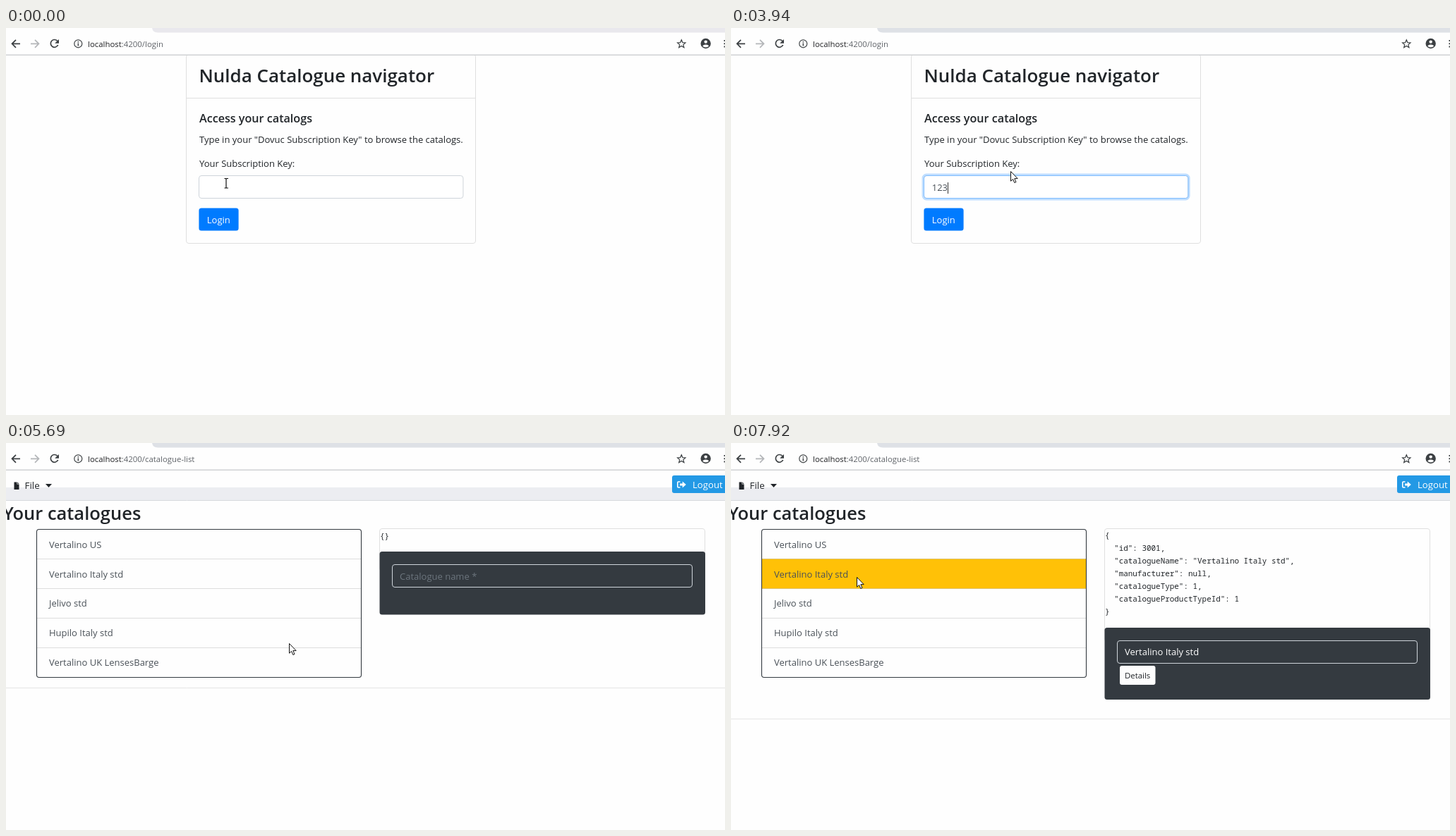
An HTML page for the animation above (8 s loop, 1019x549 px).

```html
<!DOCTYPE html>
<html lang="en">
<head>
<meta charset="utf-8">
<title>Catalogue navigator</title>
<style>
html, body { margin: 0; width: 100%; height: 100%; overflow: hidden; background: #fefefe; }
svg { display: block; width: 1019px; height: 549px; }
text { font: 13px "Open Sans", "Noto Sans", sans-serif; fill: #212529; white-space: pre; }
.h2 { font-size: 25.95px; font-weight: 600; }
.h5 { font-size: 16.15px; font-weight: 600; }
.url { font-size: 11.4px; fill: #5f6368; }
.url tspan { fill: #202124; }
.small { font-size: 10.5px; }
.soft, .soft text { fill: #495057; }
.white { fill: #fff; }
.json text { font: 10.93px "Noto Sans Mono", "DejaVu Sans Mono", monospace; }
.line { fill: none; stroke: #dfdfdf; }
.icon { fill: none; stroke: #3c4043; stroke-width: 1.7; }
.pop { fill: #fff; filter: drop-shadow(0 1px 1.5px rgba(0, 0, 0, .4)); }

/* Every change is a hard cut on one 8 s clock */
.a { animation: 8s step-end infinite; }
#strip { animation-name: strip; }
#login { animation-name: login; }
#list { animation-name: list; }
#focus { animation-name: focus; }
#pop6 { animation-name: pop6; }
#pop2 { animation-name: pop2; }
#caret { animation-name: caret; }
#k1 { animation-name: k1; }
#k2 { animation-name: k2; }
#k3 { animation-name: k3; }
#ring { animation-name: ring; }
#btn { animation-name: btn; }
#rows { animation-name: rows; }
.glyph { animation-name: glyph; }
#row1 { animation-name: row1; }
#row2 { animation-name: row2; }
#empty, #hint { animation-name: empty; }
#filled { animation-name: filled; }
#first { animation-name: first; }
#second { animation-name: second; }
#cursor { animation-name: move; }
#beam { animation-name: beam; }
#arrow { animation-name: arrow; }
#hand { animation-name: hand; }

@keyframes strip { 0% { fill: #e9e8ed } 14.5%, 100% { fill: #dee1e6 } }
@keyframes login { 0% { opacity: 1 } 67.75%, 100% { opacity: 0 } }
@keyframes list { 0% { opacity: 0 } 67.75%, 100% { opacity: 1 } }
@keyframes focus { 0% { opacity: 0 } 14.5% { opacity: 1 } 57.5%, 100% { opacity: 0 } }
@keyframes pop6 { 0% { opacity: 0 } 16% { opacity: 1 } 21.25%, 100% { opacity: 0 } }
@keyframes pop2 { 0% { opacity: 0 } 21.25% { opacity: 1 } 46.125%, 100% { opacity: 0 } }
@keyframes k1 { 0% { fill-opacity: 0 } 21.25%, 100% { fill-opacity: 1 } }
@keyframes k2 { 0% { fill-opacity: 0 } 29.25%, 100% { fill-opacity: 1 } }
@keyframes k3 { 0% { fill-opacity: 0 } 30.75%, 100% { fill-opacity: 1 } }
@keyframes caret {
  0% { opacity: 0; transform: translateX(0) }
  14.5% { opacity: 1; transform: translateX(0) }
  21.25% { opacity: 1; transform: translateX(7px) }
  29.25% { opacity: 1; transform: translateX(15px) }
  30.75% { opacity: 1; transform: translateX(22px) }
  37.75% { opacity: 0; transform: translateX(22px) }
  44.375% { opacity: 1; transform: translateX(22px) }
  51.125%, 100% { opacity: 0; transform: translateX(22px) }
}
@keyframes ring { 0% { opacity: 0 } 57.5%, 100% { opacity: 1 } }
@keyframes btn {
  0% { fill: #007bff } 55.625% { fill: #0069d9 } 57.5% { fill: #0062cc }
  59.125% { fill: #0069d9 } 61% { fill: #007bff } 64.375% { fill: #0069d9 }
  66.25%, 100% { fill: #0062cc }
}
@keyframes rows { 0% { opacity: 0 } 69.375%, 100% { opacity: 1 } }
@keyframes glyph { 0% { opacity: 0 } 71.125%, 100% { opacity: 1 } }
@keyframes row1 { 0% { fill: #fefefe } 83.125% { fill: #e9ecef } 84.625% { fill: #ffc107 } 99%, 100% { fill: #fefefe } }
@keyframes row2 { 0% { fill: #fefefe } 97.25% { fill: #e9ecef } 99%, 100% { fill: #ffc107 } }
@keyframes empty { 0% { opacity: 1 } 84.625%, 100% { opacity: 0 } }
@keyframes filled { 0% { opacity: 0 } 84.625%, 100% { opacity: 1 } }
@keyframes first { 0% { opacity: 1 } 99%, 100% { opacity: 0 } }
@keyframes second { 0% { opacity: 0 } 99%, 100% { opacity: 1 } }
@keyframes beam {
  0% { opacity: 1 } 42.75% { opacity: 0 } 51.125% { opacity: 1 } 52.625%, 100% { opacity: 0 }
}
@keyframes arrow {
  0% { opacity: 0 } 42.75% { opacity: 1 } 51.125% { opacity: 0 } 52.625% { opacity: 1 }
  54.125% { opacity: 0 } 61% { opacity: 1 } 64.375% { opacity: 0 } 67.75%, 100% { opacity: 1 }
}
@keyframes hand {
  0% { opacity: 0 } 54.125% { opacity: 1 } 61% { opacity: 0 } 64.375% { opacity: 1 } 67.75%, 100% { opacity: 0 }
}
@keyframes move {
  0% { transform: translate(312px, 220px) }
  17.875% { transform: translate(330px, 219px) }
  19.5% { transform: translate(347px, 220px) }
  30.75% { transform: translate(343px, 216px) }
  41.25% { transform: translate(358px, 212px) }
  42.75% { transform: translate(380px, 198px) }
  44.375% { transform: translate(391px, 190px) }
  46.125% { transform: translate(391px, 189px) }
  47.625% { transform: translate(394px, 195px) }
  49.25% { transform: translate(396px, 203px) }
  51.125% { transform: translate(385px, 222px) }
  52.625% { transform: translate(356px, 246px) }
  54.125% { transform: translate(322px, 272px) }
  55.625% { transform: translate(314px, 267px) }
  61% { transform: translate(332px, 268px) }
  64.375% { transform: translate(314px, 267px) }
  69.375% { transform: translate(340px, 270px) }
  71.125% { transform: translate(401px, 284px) }
  73% { transform: translate(485px, 284px) }
  74.875% { transform: translate(420px, 230px) }
  76.375% { transform: translate(350px, 174px) }
  78.25% { transform: translate(290px, 160px) }
  79.75% { transform: translate(235px, 152px) }
  81.25% { transform: translate(203px, 150px) }
  86.625% { transform: translate(291px, 217px) }
  88.5% { transform: translate(291px, 219px) }
  90.25% { transform: translate(317px, 215px) }
  91.75% { transform: translate(203px, 195px) }
  93.75% { transform: translate(190px, 193px) }
  95.375% { transform: translate(179px, 191px) }
  97.25%, 100% { transform: translate(178px, 190px) }
}
</style>
</head>
<body>
<svg viewBox="0 0 1019 549">
  <rect width="1019" height="549" fill="#fefefe"/>

  <g id="login" class="a">
    <rect class="line" x="255.5" y="37.5" width="410" height="268" rx="3.5"/>
    <path class="line" d="M256 99.5H665"/>
    <text class="h2" x="273.5" y="77">Nulda Catalogue navigator</text>
    <text class="h5" x="274" y="134">Access your catalogs</text>
    <text x="274" y="163">Type in your "Dovuc Subscription Key" to browse the catalogs.</text>
    <text x="274" y="197">Your Subscription Key:</text>
    <rect x="273.5" y="209.5" width="374.4" height="32" rx="3.5" fill="#fff" stroke="#ced4da"/>
    <g id="focus" class="a" fill="none">
      <rect x="271.9" y="207.9" width="377.4" height="35.2" rx="5" stroke="#bfdeff" stroke-width="2.6"/>
      <rect x="273.5" y="209.5" width="374.4" height="32" rx="3.5" stroke="#80bdff"/>
    </g>
    <text class="soft" x="284.7" y="231.3"><tspan id="k1" class="a">1</tspan><tspan id="k2" class="a">2</tspan><tspan id="k3" class="a">3</tspan></text>
    <rect id="caret" class="a" x="285" y="219" width="1" height="16" fill="#333"/>
    <rect id="ring" class="a" x="272.1" y="254.1" width="58.8" height="34.8" rx="5" fill="none" stroke="#80bdff" stroke-width="2.6"/>
    <rect id="btn" class="a" x="273.4" y="255.4" width="56.2" height="32.2" rx="3.5"/>
    <text class="white" x="284.8" y="276.7">Login</text>
    <g id="pop6" class="a">
      <rect class="pop" x="273" y="243" width="375.5" height="199"/>
      <text class="small" x="284" y="269">123</text>
      <text class="small" x="284" y="300">1234</text>
      <text class="small" x="284" y="331">234</text>
      <text class="small" x="284" y="362">2345</text>
      <text class="small" x="284" y="393">345</text>
      <text class="small" x="284" y="424">456</text>
    </g>
    <g id="pop2" class="a">
      <rect class="pop" x="273" y="243" width="375.5" height="75"/>
      <text class="small" x="284" y="269">123</text>
      <text class="small" x="284" y="300">1234</text>
    </g>
  </g>

  <g id="list" class="a">
    <path d="M0 63H1019V81H0Z" fill="#ecedf1"/>
    <path class="line" d="M0 81.5H1019" style="stroke:#d6d9dd"/>
    <path class="a glyph" d="M11.5 55.5H15.5V58.5H18.5V66H11.5ZM16.2 55.5L18.5 57.8H16.2Z" fill="#212529"/>
    <text x="26.5" y="65" style="font-size:13.4px">File</text>
    <path d="M56 58H65L60.5 63Z" fill="#212529"/>
    <path d="M1019 46V71H947Q944 71 944 68V49Q944 46 947 46Z" fill="#2399e5"/>
    <g class="a glyph">
      <path d="M955.5 55H952.8Q951.8 55 951.8 56V62Q951.8 63 952.8 63H955.5" fill="none" stroke="#fff" stroke-width="1.6"/>
      <path d="M955 57.5H958.7V54.5L963.8 59L958.7 63.5V60.5H955Z" fill="#fff"/>
    </g>
    <text class="white" x="973" y="63.6" style="font-size:13.2px">Logout</text>
    <text class="h2" x="191.3" y="109" text-anchor="end" style="font-size:25.5px">Your catalogues</text>

    <g id="rows" class="a">
      <rect id="row1" class="a" x="43.5" y="122.5" width="460" height="42" rx="3"/>
      <rect id="row2" class="a" x="43.5" y="164.5" width="460" height="42"/>
      <path class="line" d="M44 164.5H503M44 206.5H503M44 248.5H503M44 290.5H503" style="stroke:rgba(0,0,0,.13)"/>
      <rect x="43.5" y="122.5" width="460" height="210" rx="3.5" fill="none" stroke="#343a40" stroke-width="1.1"/>
      <g class="soft">
        <text x="61" y="148.7">Vertalino US</text>
        <text x="61" y="190.6">Vertalino Italy std</text>
        <text x="61" y="232.4">Jelivo std</text>
        <text x="61" y="274.2">Hupilo Italy std</text>
        <text x="61" y="316">Vertalino UK LensesBarge</text>
      </g>
    </g>

    <g id="empty" class="a json">
      <rect class="line" x="529.5" y="121.5" width="461" height="60" rx="3.5"/>
      <text x="530" y="135.5">{}</text>
      <rect x="529.5" y="154" width="461.5" height="89.5" rx="3.5" fill="#343a40"/>
      <rect x="547.5" y="172.5" width="425" height="32" rx="3.5" fill="none" stroke="#ced4da"/>
      <path class="line" d="M0 347.5H1019" style="stroke:#e5e5e5"/>
    </g>
    <text id="hint" class="a" x="558" y="193.7" style="fill:#6c757d">Catalogue name *</text>

    <g id="filled" class="a">
      <rect class="line" x="529.5" y="121.5" width="461" height="160" rx="3.5"/>
      <g class="json">
        <text x="530" y="135.2">{</text>
        <text x="543.1" y="188.8">"manufacturer": null,</text>
        <text x="543.1" y="206.8">"catalogueType": 1,</text>
        <text x="543.1" y="224.7">"catalogueProductTypeId": 1</text>
        <text x="530" y="242.6">}</text>
      </g>
      <rect x="529.5" y="262" width="461.5" height="102" rx="3.5" fill="#343a40"/>
      <rect x="547.5" y="280.5" width="425" height="32" rx="3.5" fill="none" stroke="#ced4da"/>
      <rect x="551" y="316" width="50.5" height="27" rx="3" fill="#fdfdfd"/>
      <text x="558" y="333.7" style="font-size:11.4px">Details</text>
      <path class="line" d="M0 391.5H1019" style="stroke:#e5e5e5"/>
      <g id="first" class="a">
        <g class="json">
          <text x="543.1" y="153">"id": 1001,</text>
          <text x="543.1" y="170.9">"catalogueName": "Vertalino US",</text>
        </g>
        <text class="white" x="558" y="301.4">Vertalino US</text>
      </g>
      <g id="second" class="a">
        <g class="json">
          <text x="543.1" y="153">"id": 3001,</text>
          <text x="543.1" y="170.9">"catalogueName": "Vertalino Italy std",</text>
        </g>
        <text class="white" x="558" y="301.4">Vertalino Italy std</text>
      </g>
    </g>
  </g>

  <!-- browser bar -->
  <rect width="1019" height="38" fill="#fefefe"/>
  <path id="strip" class="a" d="M207 0Q208 6.5 215 6.5H1019V0Z"/>
  <rect y="37.6" width="1019" height="1.3" fill="#c9cbce"/>
  <path class="icon" d="M20 22.3H8.8M14 16.8L8.5 22.3L14 27.8"/>
  <path class="icon" d="M35 22.3H46.2M41 16.8L46.5 22.3L41 27.8" style="stroke:#b4b6b9"/>
  <path class="icon" d="M73 18.6A5.4 5.4 0 1 0 73.7 24"/>
  <path d="M75 16V21.8H69.2Z" fill="#3c4043"/>
  <circle class="icon" cx="102.3" cy="22.3" r="5.5" style="stroke-width:1.2"/>
  <path d="M101.6 19H103V20.4H101.6ZM101.6 21.4H103V25.6H101.6Z" fill="#3c4043"/>
  <text class="url a" x="116" y="26.5" style="animation-name:login"><tspan>localhost</tspan>:4200/login</text>
  <text class="url a" x="116" y="26.5" style="animation-name:list"><tspan>localhost</tspan>:4200/catalogue-list</text>
  <path class="icon" d="M957.3 16.8L958.9 20.6L963 20.9L959.9 23.6L960.9 27.6L957.3 25.4L953.7 27.6L954.7 23.6L951.6 20.9L955.7 20.6Z" style="stroke-width:1.2"/>
  <circle cx="991.7" cy="22" r="7.2" fill="#3c4043"/>
  <circle cx="991.7" cy="19.6" r="2.2" fill="#fff"/>
  <path d="M987.2 25.6Q988.5 23.4 991.7 23.4T996.2 25.6Q994.6 27.6 991.7 27.6T987.2 25.6Z" fill="#fff"/>
  <path d="M1017.5 17h2v2h-2zM1017.5 21.3h2v2h-2zM1017.5 25.6h2v2h-2z" fill="#3c4043"/>

  <g id="cursor" class="a">
    <path id="beam" class="a" d="M-2.5-6.5H-1Q0-6.5 0-5.5Q0-6.5 1-6.5H3M0-5.5V6M-2.5 7H-1Q0 7 0 6Q0 7 1 7H3" fill="none" stroke="#111" stroke-width="1.2"/>
    <path id="arrow" class="a" d="M.5.5V14.2L3.6 11.4L5.8 16.5L8 15.5L5.8 10.6H10.2Z" fill="#fff" stroke="#111"/>
    <g id="hand" class="a" fill="#fff" stroke="#111">
      <path d="M-1.6 1.2Q-1.6-.5 0-.5T1.6 1.2V6.4Q3.6 5.4 4.4 7Q6.3 6.2 7 7.9Q9 7.4 9 9.4V13.5Q9 16 7.5 17.5V19.5H-.8V18Q-3 15.5-5 12Q-6 10-4.6 9.6Q-3.4 9.4-1.6 11.8Z"/>
      <path d="M1.6 6.4V10M4.4 7V10M7 7.9V10.5" stroke-width=".8"/>
    </g>
  </g>
</svg>
</body>
</html>
```
